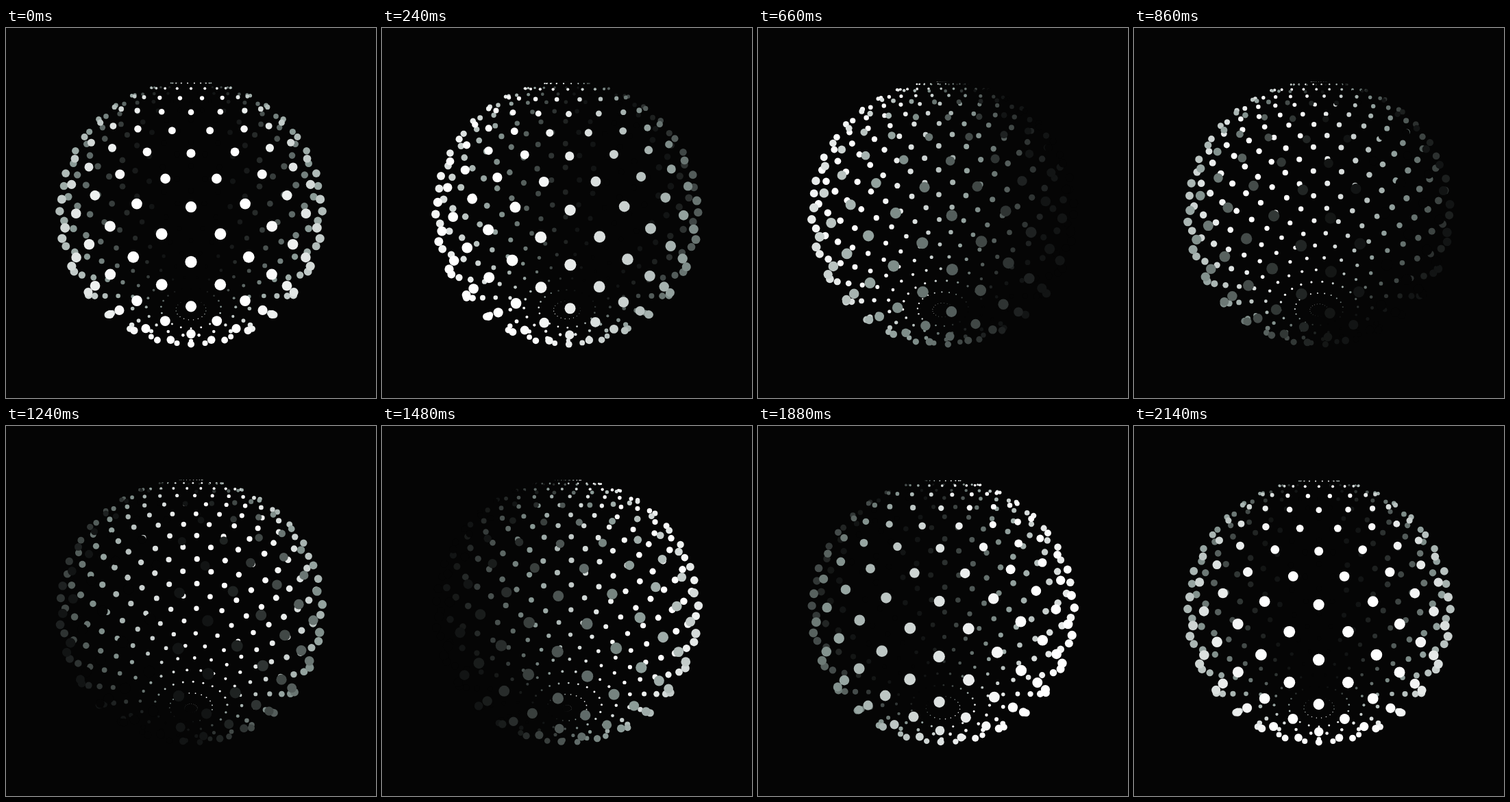
An HTML page with a canvas that plays this animation: 540 px wide and 540 px high, repeating every 2160 ms.

```html
<!DOCTYPE html>
<html lang="en">
<head>
<meta charset="utf-8">
<title>Dotted sphere</title>
<style>
  html, body { margin: 0; width: 100%; height: 100%; overflow: hidden; background: #050505; }
  canvas { display: block; width: 540px; height: 540px; }
</style>
</head>
<body>
<canvas id="stage" width="540" height="540"></canvas>
<script>
const ctx = document.getElementById('stage').getContext('2d');
const SIZE = 540, LOOP = 2160, STEP = 20;
const RAD = Math.PI / 180;
const ROW_GAP = 180 / 22, COLS = 20, COL_GAP = 360 / COLS;
const TILT = 22.8 * RAD, DEPTH = 0.387, SCALE = 177, DOT = 5.45;
const BACK = [5, 5, 5], MID = [138, 154, 150], WHITE = [255, 255, 255];

const mix = (a, b, k) => a.map((v, i) => Math.round(v + (b[i] - v) * k));

// light runs from -1 (hidden against the background) to 1 (white)
function shade(light) {
  if (light < -0.94) return `rgb(${BACK})`;
  const k = Math.min(1, light * 1.06);
  const rgb = k < 0 ? mix(MID, BACK, Math.min(0.9, -k)) : mix(MID, WHITE, k);
  return `rgb(${rgb})`;
}

function makeDot(row, col, t) {
  const lat = (row - t) * ROW_GAP * RAD;
  const lonDeg = col * COL_GAP + (t + 1 - row) * COL_GAP / 2;
  const lon = lonDeg * RAD;
  const ring = Math.cos(lat), up = Math.sin(lat), front = ring * Math.cos(lon);
  const z = front * Math.cos(TILT) + up * Math.sin(TILT);
  const y = up * Math.cos(TILT) - front * Math.sin(TILT);
  const zoom = 1 / (1 - DEPTH * z);
  return {
    x: SIZE / 2 + SCALE * ring * Math.sin(lon) * zoom,
    y: SIZE / 2 - SCALE * y * zoom,
    z,
    r: DOT * ring * zoom,
    fill: shade(Math.cos((lonDeg + 360 * t) * RAD))
  };
}

function draw(t) {
  ctx.fillStyle = `rgb(${BACK})`;
  ctx.fillRect(0, 0, SIZE, SIZE);
  const dots = [];
  for (let row = -10; row <= 11; row++) {
    for (let col = 0; col < COLS; col++) dots.push(makeDot(row, col, t));
  }
  dots.sort((a, b) => a.z - b.z);
  for (const d of dots) {
    ctx.fillStyle = d.fill;
    ctx.beginPath();
    ctx.arc(d.x, d.y, Math.max(0, d.r), 0, 2 * Math.PI);
    ctx.fill();
  }
}

const start = performance.now();
function tick() {
  const ms = (performance.now() - start) % LOOP;
  draw(Math.floor(ms / STEP) * STEP / LOOP);
  requestAnimationFrame(tick);
}
tick();
</script>
</body>
</html>
```
